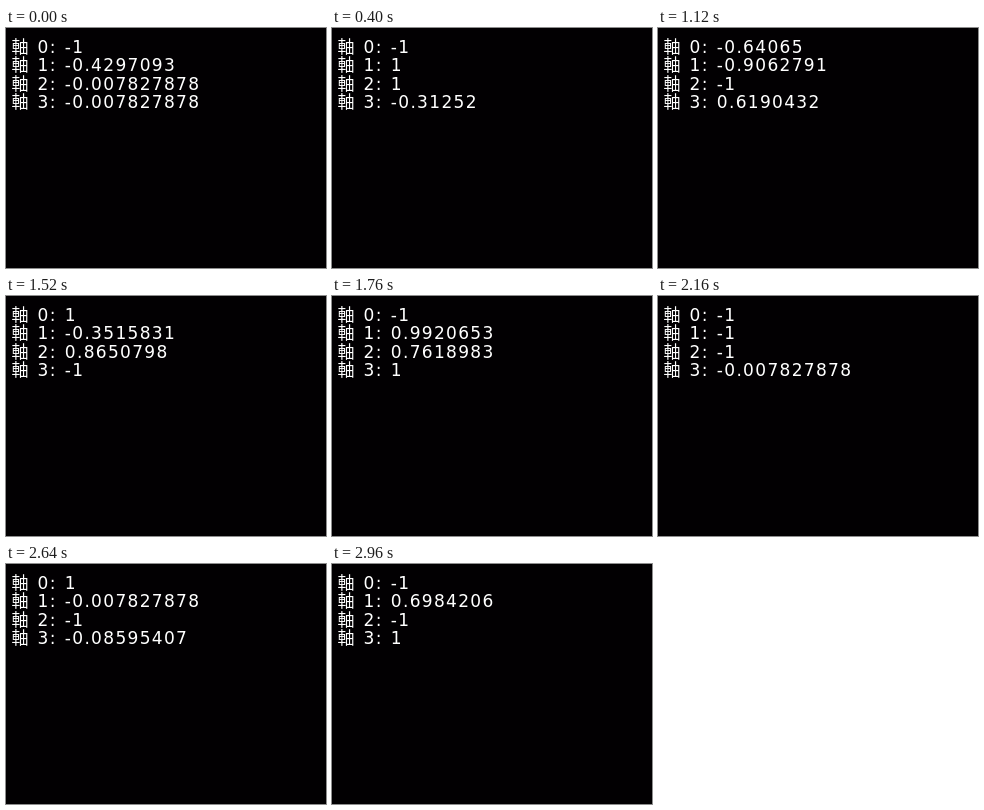
An HTML page that plays this animation: 320x240 px, repeating every 3040 ms.

```html
<!DOCTYPE html>
<html lang="ja">
<head>
<meta charset="utf-8">
<title>Axis readout</title>
<style>
  html, body { margin: 0; width: 100%; height: 100%; overflow: hidden; background: #020002; }
  svg { display: block; width: 320px; height: 240px; }
  text {
    fill: #fff;
    font: 17px "DejaVu Sans", "Noto Sans CJK JP", "Noto Sans CJK", sans-serif;
    letter-spacing: 1.32px;
    white-space: pre;
  }
</style>
</head>
<body>
<svg id="stage" viewBox="0 0 320 240"></svg>
<script>
const LOOP = 3040, TICK = 80;
const MIN = -128, MAX = 126, REST = -1;
const baselines = [25, 43, 62, 80];

// Stick poses: first tick, last tick held, then the raw step of each axis.
const poses = [
  [0, 1, MIN, -55, REST, REST],
  [3, 3, MIN, MAX, REST, MIN],
  [5, 6, MIN, MAX, MAX, -40],
  [8, 8, MAX, MAX, MAX, MAX],
  [10, 10, 111, MIN, REST, MAX],
  [12, 13, MIN, -92, MIN, REST],
  [16, 18, MAX, REST, MIN, MAX],
  [19, 19, MAX, -45, 109, MIN],
  [21, 21, REST, MAX, MAX, MAX],
  [23, 24, MIN, REST, -30, MAX],
  [27, 27, MIN, MIN, MIN, REST],
  [29, 29, 84, MIN, MAX, MIN],
  [31, 31, MAX, MAX, REST, -60],
  [33, 33, MAX, REST, MIN, -11],
  [35, 35, REST, MIN, 60, MIN],
  [37, 37, MIN, 88, MIN, MAX]
];

const stage = document.getElementById("stage");

function addText(x, y, content) {
  const el = document.createElementNS("http://www.w3.org/2000/svg", "text");
  el.setAttribute("x", x);
  el.setAttribute("y", y);
  el.textContent = content;
  stage.appendChild(el);
  return el;
}

const readouts = baselines.map((y, i) => {
  addText(5.5, y, "軸");
  addText(31.5, y, i + ":");
  return addText(58.8, y, "");
});

const clamp = (v, low, high) => Math.max(low, Math.min(high, v));

// Raw step to a 16-bit reading, then to -1..1 in single precision.
function format(step) {
  const offset = step < 0 ? 256 * step : Math.round(step * 32768 / MAX);
  const reading = clamp(32767 + offset, 0, 65535);
  const value = Math.fround(reading / 65535) * 2 - 1;
  return String(Number(value.toPrecision(7)));
}

// A circling stick swings outside the straight line between two poses.
function stepAt(axis, tick) {
  const i = poses.findLastIndex(p => p[0] <= tick);
  const from = poses[i], to = poses[(i + 1) % poses.length];
  const a = from[axis + 2], b = to[axis + 2];
  if (tick <= from[1] || a === b) return a;
  const part = (tick - from[1]) / (to[0] - from[1]);
  const swell = 1 + 4 * part * (1 - part);
  return clamp(Math.round((a + (b - a) * part) * swell), MIN, MAX) || REST;
}

let shown = -1;
function draw() {
  const tick = Math.floor(performance.now() % LOOP / TICK);
  if (tick !== shown) {
    shown = tick;
    readouts.forEach((el, axis) => { el.textContent = format(stepAt(axis, tick)); });
  }
  requestAnimationFrame(draw);
}
draw();
</script>
</body>
</html>
```
